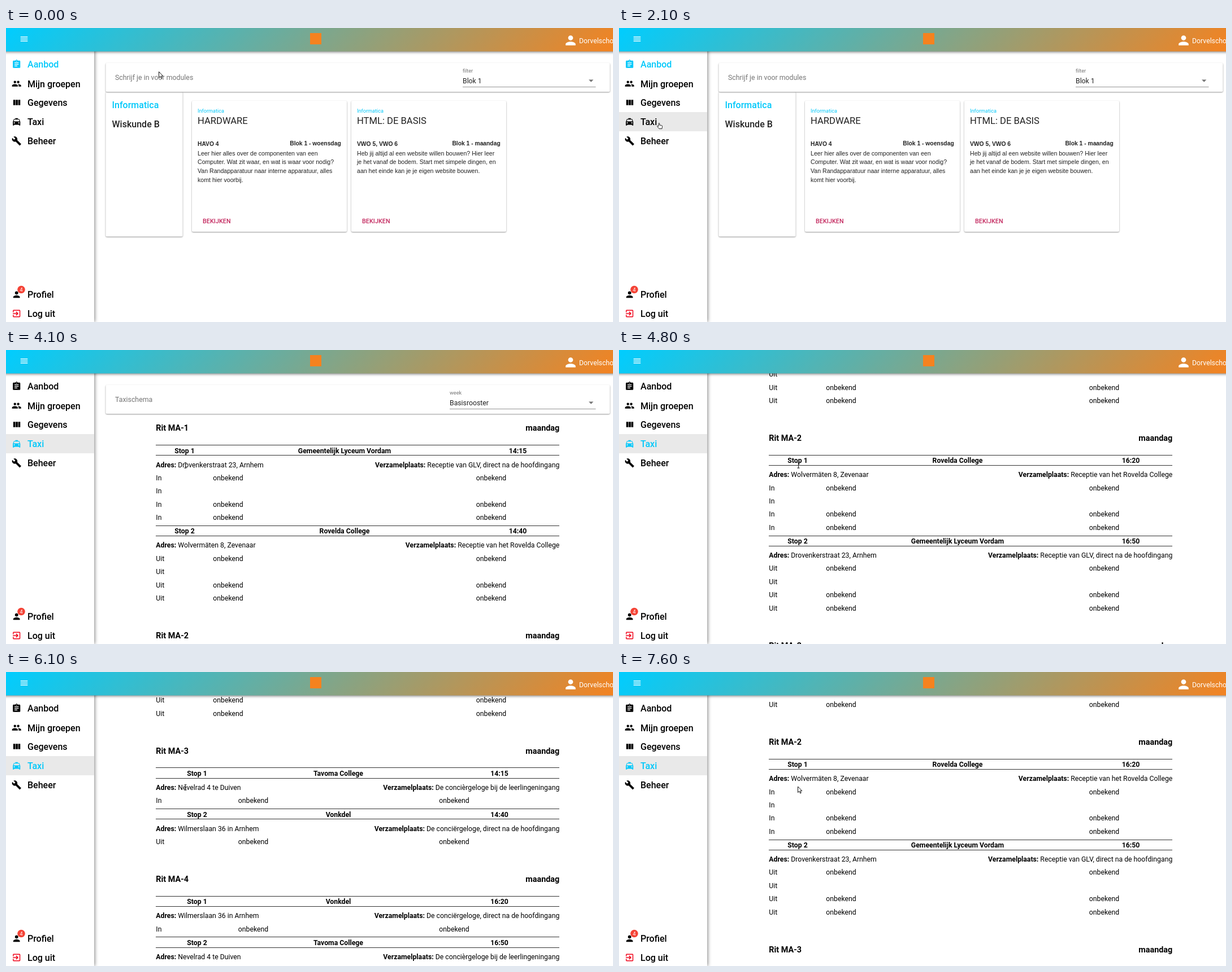
An HTML page for the animation above (8 s loop, 1074x521 px).

```html
<!DOCTYPE html>
<html lang="nl">
<head>
<meta charset="utf-8">
<title>Taxischema</title>
<style>
  html, body { margin: 0; width: 100%; height: 100%; overflow: hidden; background: #fff; }
  svg { display: block; width: 1074px; height: 521px; font-family: Roboto, sans-serif; }
  .paper { fill: #fff; filter: drop-shadow(0 1px 1.3px rgba(0,0,0,.42)); }
  .arial { font-family: "Liberation Sans", Arial, sans-serif; }
  .rule { fill: #333; shape-rendering: crispEdges; }
</style>
</head>
<body>
<svg id="stage" viewBox="0 0 1074 521"></svg>
<script>
const BLUE = '#00c8fa', INK = '#222', GREY = '#757575', BODY = 12.25;

// y is the middle of the capitals
const text = (x, y, str, { size = BODY, weight = 400, fill = '#000', anchor = 'start', extra = '' } = {}) =>
  `<text x="${x}" y="${(y + size * .355).toFixed(2)}" font-size="${size}" font-weight="${weight}" fill="${fill}" text-anchor="${anchor}" ${extra}>${str}</text>`;
const rect = (x, y, w, h, attrs = '') => `<rect x="${x}" y="${y}" width="${w}" height="${h}" ${attrs}/>`;
const paper = (x, y, w, h) => rect(x, y, w, h, 'rx="2" class="paper"');
const icon = (x, y, name, scale = .73, fill = '#000') =>
  `<path transform="translate(${x} ${y}) scale(${scale}) translate(-12 -12)" fill="${fill}" fill-rule="evenodd" d="${icons[name]}"/>`;

const icons = {
  menu: 'M3 18h18v-2H3v2zm0-5h18v-2H3v2zm0-7v2h18V6H3z',
  tasks: 'M19 3h-4.18C14.4 1.84 13.3 1 12 1c-1.3 0-2.4.84-2.82 2H5c-1.1 0-2 .9-2 2v14c0 1.1.9 2 2 2h14c1.1 0 2-.9 2-2V5c0-1.1-.9-2-2-2zm-7 0c.55 0 1 .45 1 1s-.45 1-1 1-1-.45-1-1 .45-1 1-1zm2 14H7v-2h7v2zm3-4H7v-2h10v2zm0-4H7V7h10v2z',
  group: 'M16 11c1.66 0 3-1.34 3-3s-1.34-3-3-3-3 1.34-3 3 1.34 3 3 3zm-8 0c1.66 0 3-1.34 3-3S9.66 5 8 5 5 6.34 5 8s1.34 3 3 3zm0 2c-2.33 0-7 1.17-7 3.5V19h14v-2.5c0-2.33-4.67-3.5-7-3.5zm8 0c-.29 0-.62.02-.97.05 1.16.84 1.97 1.97 1.97 3.45V19h6v-2.5c0-2.33-4.67-3.5-7-3.5z',
  columns: 'M10 18h5V5h-5v13zm-6 0h5V5H4v13zM16 5v13h5V5h-5z',
  taxi: 'M18.92 6.01C18.72 5.42 18.16 5 17.5 5H15V3H9v2H6.5c-.66 0-1.21.42-1.42 1.01L3 12v8c0 .55.45 1 1 1h1c.55 0 1-.45 1-1v-1h12v1c0 .55.45 1 1 1h1c.55 0 1-.45 1-1v-8l-2.08-5.99zM6.5 16a1.5 1.5 0 1 1 0-3 1.5 1.5 0 0 1 0 3zm11 0a1.5 1.5 0 1 1 0-3 1.5 1.5 0 0 1 0 3zM5 11l1.5-4.5h11L19 11H5z',
  wrench: 'M22.7 19l-9.1-9.1c.9-2.3.4-5-1.5-6.9-2-2-5-2.4-7.4-1.3L9 6 6 9 1.6 4.7C.4 7.1.9 10.1 2.9 12.1c1.9 1.9 4.6 2.4 6.9 1.5l9.1 9.1c.4.4 1 .4 1.4 0l2.3-2.3c.5-.4.5-1.1.1-1.4z',
  person: 'M12 12c2.21 0 4-1.79 4-4s-1.79-4-4-4-4 1.79-4 4 1.79 4 4 4zm0 2c-2.67 0-8 1.34-8 4v2h16v-2c0-2.66-5.33-4-8-4z',
  exit: 'M10.09 15.59L11.5 17l5-5-5-5-1.41 1.41L12.67 11H3v2h9.67l-2.58 2.59zM19 3H5c-1.11 0-2 .9-2 2v4h2V5h14v14H5v-4H3v4c0 1.1.89 2 2 2h14c1.1 0 2-.9 2-2V5c0-1.1-.9-2-2-2z'
};

function titleBar(title, x, label, value, id) {
  return paper(176.5, 62, 892, 51) + text(193, 88, title, { size: 12.35, fill: GREY }) +
    `<g id="${id}">` + text(x, 76, label, { size: 9.1, fill: GREY }) + text(x, 93.3, value, { fill: INK }) + '</g>' +
    rect(x, 104, 1043.5 - x, 1, 'fill="#949494"') + '<path d="M1031 91.5h8.4l-4.2 4.2z" fill="#757575"/>';
}

function courseCard(x, title, level, day, lines) {
  const bold = { size: 10.3, weight: 700, fill: INK, extra: 'class="arial"' };
  return paper(x, 129, 274, 232) +
    text(x + 10, 146.3, 'Informatica', { size: 9.15, fill: BLUE }) +
    text(x + 10, 164.3, title, { size: 16.6, fill: INK }) +
    text(x + 10, 205.8, level, bold) +
    text(x + 263.7, 204.8, 'Blok 1 - ' + day, { ...bold, anchor: 'end' }) +
    lines.map((line, i) => text(x + 10, 221.8 + i * 15.75, line, { size: 10.6, fill: INK, extra: 'class="arial"' })).join('') +
    text(x + 19, 342, 'BEKIJKEN', { size: 10.7, weight: 500, fill: '#c2255c', extra: 'letter-spacing=".1"' });
}

const coursesPage = paper(176.5, 113, 136, 256.5) +
  titleBar('Schrijf je in voor modules', 808, 'filter', 'Blok 1', 'filter') +
  text(187.5, 136, 'Informatica', { size: 16, weight: 500, fill: BLUE }) +
  text(187.5, 170.3, 'Wiskunde B', { size: 16, weight: 500, fill: INK }) +
  courseCard(329, 'HARDWARE', 'HAVO 4', 'woensdag', [
    'Leer hier alles over de componenten van een',
    'Computer. Wat zit waar, en wat is waar voor nodig?',
    'Van Randapparatuur naar interne apparatuur, alles',
    'komt hier voorbij.']) +
  courseCard(611, 'HTML: DE BASIS', 'VWO 5, VWO 6', 'maandag', [
    'Heb jij altijd al een website willen bouwen? Hier leer',
    'je het vanaf de bodem. Start met simpele dingen, en',
    'aan het einde kan je je eigen website bouwen.']);

const lyceum = ['Gemeentelijk Lyceum Vordam', 'Drovenkerstraat 23, Arnhem', 'Receptie van GLV, direct na de hoofdingang'];
const rovelda = ['Rovelda College', 'Wolvermäten 8, Zevenaar', 'Receptie van het Rovelda College'];
const tavoma = ['Tavoma College', 'Nevelrad 4 te Duiven', 'De concièrgeloge bij de leerlingeningang'];
const vonkdel = ['Vonkdel', 'Wilmerslaan 36 in Arnhem', 'De conciërgeloge, direct na de hoofdingang'];
const rides = [
  ['MA-1', 'maandag', 4, lyceum, '14:15', rovelda, '14:40'],
  ['MA-2', 'maandag', 4, rovelda, '16:20', lyceum, '16:50'],
  ['MA-3', 'maandag', 1, tavoma, '14:15', vonkdel, '14:40'],
  ['MA-4', 'maandag', 1, vonkdel, '16:20', tavoma, '16:50'],
  ['WO-1', 'woensdag', 4, rovelda, '15:45', lyceum, '16:10']
];

function stopTable(y, number, [name, address, meeting], time, count) {
  const [stopX, nameX, timeX, leftX, rightX] =
    count > 1 ? [316, 599, 905.5, 393, 858.5] : [338, 588, 873, 437.5, 793];
  const head = (x, str) => text(x, y + 9.7, str, { weight: 700, anchor: 'middle' });
  const field = (label, value) => `<tspan font-weight="700">${label}:</tspan> ${value}`;
  const rule = dy => rect(265, Math.round(y + dy - .5), 714, 1, 'class="rule"');
  let out = rule(0) + rule(18.3) + head(stopX, 'Stop ' + number) + head(nameX, name) + head(timeX, time) +
    text(265.3, y + 34.7, field('Adres', address)) +
    text(979.3, y + 34.7, field('Verzamelplaats', meeting), { anchor: 'end' });
  for (let i = 0; i < count; i++) {
    const rowY = y + 58.1 + i * 23.4;
    out += text(265.3, rowY, number === 1 ? 'In' : 'Uit');
    if (i !== 1) out += [leftX, rightX].map(x => text(x, rowY, 'onbekend', { anchor: 'middle' })).join('');
  }
  return out;
}

let rideY = 138;
const rideList = rides.map(([name, day, count, from, start, to, end]) => {
  const title = { size: 14.4, weight: 700 }, height = 49.2 + 23.4 * count, top = rideY + 30.5;
  const out = text(265.3, rideY, 'Rit ' + name, title) + text(979.3, rideY, day, { ...title, anchor: 'end' }) +
    stopTable(top, 1, from, start, count) + stopTable(top + height, 2, to, end, count);
  rideY = top + 2 * height + 51.6;
  return out;
}).join('');

const menuItem = (y, name, label, id = '') =>
  `<g id="${id}">` + icon(18.7, y, name, .73, 'currentColor') +
  text(38, y + .3, label, { size: 16, weight: 500, fill: 'currentColor' }) + '</g>';

const stage = document.getElementById('stage');
stage.innerHTML = `
  <defs>
    <linearGradient id="bar" gradientUnits="userSpaceOnUse" x2="562" y2="562">
      <stop stop-color="#00cdff"/><stop offset="1" stop-color="#f5821f"/>
    </linearGradient>
    <clipPath id="row">${rect(0, 149, 156, 34)}</clipPath>
  </defs>
  <g id="courses">${coursesPage}</g>
  <g id="taxis">${titleBar('Taxischema', 785, 'week', 'Basisrooster', 'week')}
    <g id="waiting">${text(785, 93.3, 'week', { fill: GREY })}</g>
    <g id="rides">${rideList}</g></g>
  ${rect(0, 0, 156, 521, 'fill="#fff" style="filter:drop-shadow(1px 0 3px rgba(0,0,0,.5))"')}
  ${rect(0, 149, 156, 34, 'id="hover" fill="#e9e9e9"')}
  <circle id="ripple" cx="70" cy="169" fill="#000" opacity=".07" clip-path="url(#row)"/>
  ${menuItem(64.3, 'tasks', 'Aanbod', 'offer')}
  ${menuItem(98.7, 'group', 'Mijn groepen')}
  ${menuItem(132.3, 'columns', 'Gegevens')}
  ${menuItem(166.3, 'taxi', 'Taxi', 'taxi')}
  ${menuItem(200.2, 'wrench', 'Beheer')}
  ${menuItem(472.3, 'person', 'Profiel')}
  <circle cx="27" cy="463.5" r="6.8" fill="#f44336"/>
  ${text(27, 463.6, '4', { size: 9, fill: '#fff', anchor: 'middle' })}
  ${icon(18.7, 506, 'exit', .73, '#f00018')}
  ${text(38, 506.5, 'Log uit', { size: 16, weight: 500 })}
  ${rect(-9, 0, 1092, 41.5, 'fill="url(#bar)" style="filter:drop-shadow(0 1px 2.5px rgba(0,0,0,.55))"')}
  ${icon(32, 19.5, 'menu', .7, '#fff')}
  ${rect(538, 9, 20, 20, 'fill="#f5821f"')}
  ${icon(999, 22, 'person', 1.1, '#fff')}
  ${text(1014, 22.5, 'Dorvelschool', { fill: '#fff' })}
  <g id="cursor" stroke-linejoin="round">
    <path id="arrow" d="M.5.5V11L3 8.8l1.7 3.7 1.6-.8L4.7 8.2h3.2z" fill="#fff" stroke="#111"/>
    <path id="hand" d="M0 1.2Q.9-.4 1.8 1.2V4l4 .8q1 .3.8 1.5L6 10.5H1L-2.3 6.6q-.4-1.3.8-1.1L0 6.4z" fill="#fff" stroke="#111" stroke-width=".9"/>
    <path id="beam" d="M-2-4.8H2M-2 4.8H2M0-4.8V4.8" fill="none" stroke="#333" stroke-width="1.2"/>
  </g>`;

const el = {};
stage.querySelectorAll('[id]').forEach(node => { el[node.id] = node; });
const show = (node, on) => { node.style.display = on ? '' : 'none'; };
const mix = (a, b, p) => a + (b - a) * p;
const progress = (t, from, to) => Math.min(1, Math.max(0, (t - from) / (to - from)));

const scrolls = [[4400, 171], [4800, 350], [5200, 493], [5600, 628], [6100, 734], [6700, 844], [7200, 613], [7600, 382]];

function cursorAt(t) {
  if (t < 1400) {
    const p = progress(t, 400, 1300), eased = p * p * (3 - 2 * p);
    return [mix(270, 39, eased), mix(77, 133, eased), 'arrow'];
  }
  if (t < 2300) {
    const p = progress(t, 1300, 1700);
    return [mix(39, 70, p), mix(133, 168, p), 'hand'];
  }
  if (t < 4100) {
    const p = progress(t, 2200, 2500);
    return [mix(70, 316, p), mix(168, 203, p), 'arrow'];
  }
  return t < 7600 ? [317.5, 204.3, 'beam'] : [316, 202.5, 'arrow'];
}

function draw(now) {
  const t = Math.floor(now % 8000 / 100) * 100;
  const opened = t >= 2200, loaded = t >= 4100;

  show(el.courses, !opened);
  show(el.taxis, opened);
  show(el.rides, loaded);
  show(el.week, loaded);
  show(el.waiting, !loaded);
  const scroll = scrolls.reduce((y, [at, to]) => t >= at ? to : y, 0);
  el.taxis.setAttribute('transform', `translate(0 ${-scroll})`);

  el.offer.style.color = opened ? '#000' : BLUE;
  el.taxi.style.color = opened ? BLUE : '#000';

  const [x, y, shape] = cursorAt(t);
  el.cursor.setAttribute('transform', `translate(${x} ${y})`);
  for (const name of ['arrow', 'hand', 'beam']) show(el[name], name === shape);

  show(el.hover, t >= 1400);
  el.hover.setAttribute('y', opened || y > 149 ? 149 : 115);
  show(el.ripple, opened && !loaded);
  el.ripple.setAttribute('r', 100 * progress(t, 2100, 2500));

  requestAnimationFrame(() => draw(performance.now() - start));
}
const start = performance.now();
draw(0);
</script>
</body>
</html>
```
